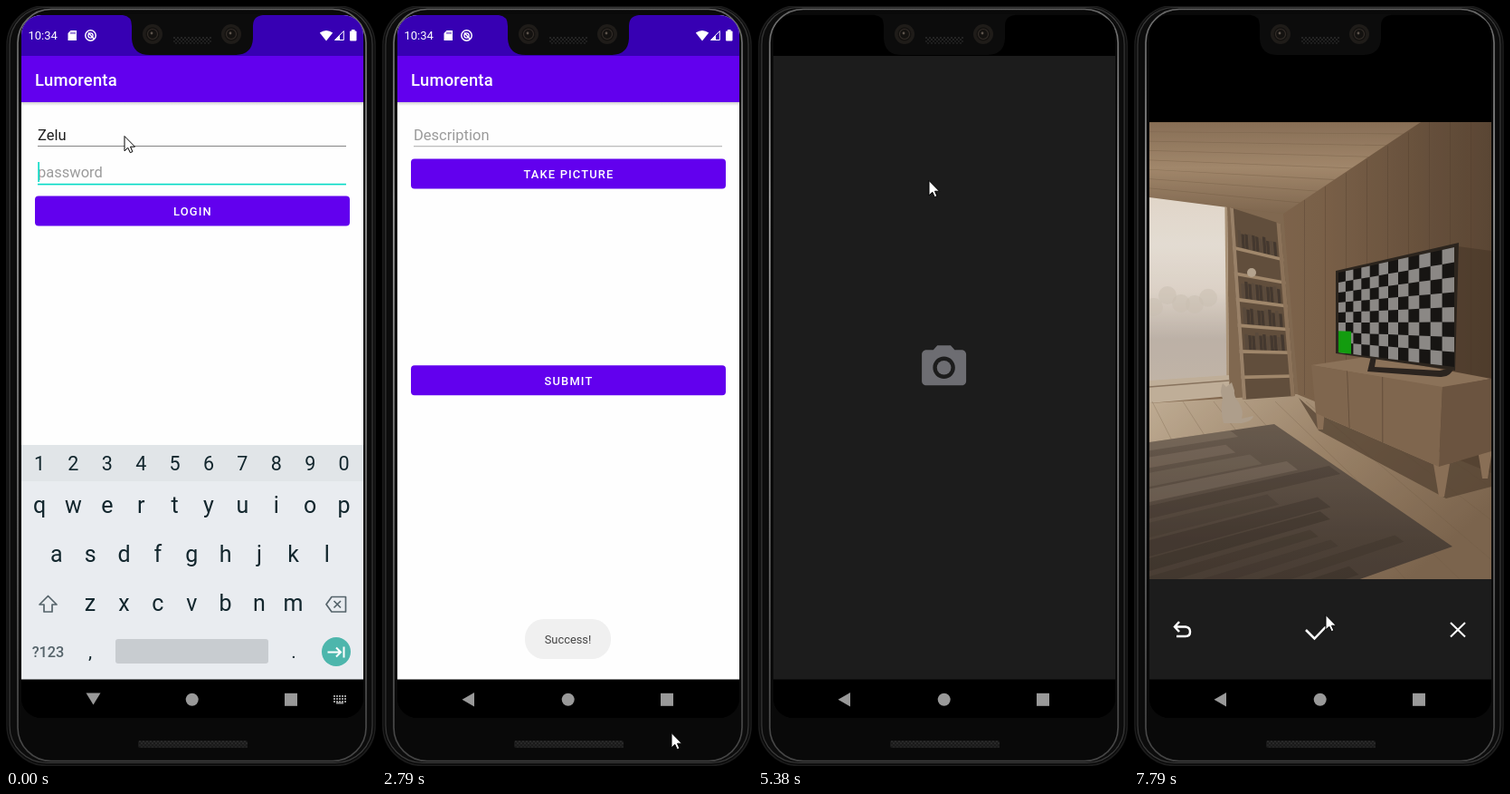
An HTML page that plays this animation: 409x838 px, repeating every 8000 ms.

```html
<!DOCTYPE html>
<html lang="en">
<head>
<meta charset="utf-8">
<title>Photo app demo</title>
<style>
html, body { margin: 0; width: 100%; height: 100%; overflow: hidden; background: #000; }
svg { display: block; width: 100%; height: 100%; font-family: Roboto, sans-serif; }
.mid { text-anchor: middle; }
.btn { font-size: 12.9px; font-weight: 500; letter-spacing: 1.15px; fill: #fff; text-anchor: middle; }
.field { font-size: 16.5px; fill: #1f1f1f; }
.hint { fill: #9b9b9b; }
</style>
</head>
<body>
<svg id="stage" viewBox="0 0 409 838"></svg>
<script>
const LOOP = 8000;
const TICK = 130;
const USER = 'Zelu';
const APP = 'Lumorenta';
// Pointer way points: time, x, y.
const POINTER = [[0, 131, 143], [1320, 131, 143], [1620, 227, 215], [2280, 227, 215], [2790, 320, 801],
  [3030, 192, 491], [3420, 161, 216], [4080, 198, 158], [4230, 191, 186], [5380, 189, 192],
  [5680, 192, 282], [6310, 225, 671], [6580, 212, 671], [LOOP, 212, 671]];

const rect = (x, y, w, h, fill, r = 0, more = '') =>
  `<rect x="${x}" y="${y}" width="${w}" height="${h}" rx="${r}" fill="${fill}" ${more}/>`;
const poly = (pts, fill, more = '') => `<polygon points="${pts}" fill="${fill}" ${more}/>`;
const circle = (x, y, r, fill, more = '') => `<circle cx="${x}" cy="${y}" r="${r}" fill="${fill}" ${more}/>`;
const path = (d, fill, more = '') => `<path d="${d}" fill="${fill}" ${more}/>`;
const line = (d, color, w, more = '') => path(d, 'none', `stroke="${color}" stroke-width="${w}" ${more}`);
const text = (x, y, s, more = '') => `<text x="${x}" y="${y}" ${more}>${s}</text>`;
const group = (id, body, more = '') => `<g id="${id}" ${more}>${body}</g>`;
const clip = (id, shape) => `<clipPath id="${id}">${shape}</clipPath>`;
const times = (n, f) => Array.from({ length: n }, (_, i) => f(i)).join('');
const mix = (a, b, k) => a + (b - a) * k;
const grad = (id, colors, dir = 'x2="0" y2="1"') => `<linearGradient id="${id}" ${dir}>` +
  colors.map((c, i) => `<stop offset="${i / (colors.length - 1)}" stop-color="${c}"/>`).join('') + '</linearGradient>';

let seed = 7;
const random = () => (seed = seed * 16807 % 2147483647) / 2147483647;

// A flat surface seen in perspective; patches are given in 0..1 across and down.
function plane(tl, tr, br, bl) {
  const at = (u, v) => [0, 1].map(n => mix(mix(tl[n], tr[n], u), mix(bl[n], br[n], u), v).toFixed(1)).join();
  return (fill, u0 = 0, v0 = 0, u1 = 1, v1 = 1, more = '') =>
    poly([at(u0, v0), at(u1, v0), at(u1, v1), at(u0, v1)].join(' '), fill, more);
}

const button = (y, label, wave) => rect(32, y, 348, 33, '#6200ee', 4) +
  (wave ? clip(wave + 'Clip', rect(32, y, 348, 33, '#000', 4)) +
    `<g clip-path="url(#${wave}Clip)">${circle(0, 0, 0, '#fff', `id="${wave}" fill-opacity=".25"`)}</g>` : '') +
  text(206.5, y + 21.5, label, 'class="btn"');

function appChrome() {
  return rect(17, 10, 378, 733, '#fefefe') + rect(17, 106, 378, 4, 'url(#shade)') +
    rect(17, 10, 378, 45, '#3700b3') + rect(17, 55, 378, 51, '#6200ee') +
    text(32, 88, APP, 'fill="#fff" font-size="18.4" font-weight="500" letter-spacing=".2"') +
    text(24.5, 37, '10:34', 'fill="#fff" font-size="13"') +
    path('M71.5 27H78V38H68.5V30Z', '#fff') + line('M72 28.5v2.5M74 28.5v2.5M76 28.5v2.5', '#3700b3', .9) +
    circle(93.5, 32.5, 5.7, 'none', 'stroke="#fff" stroke-width="1.5"') +
    circle(93.5, 32.5, 2.6, 'none', 'stroke="#fff" stroke-width="1.3"') + line('M91 29.5l6.5 7', '#fff', 1.5) +
    path('M346.8 29.5Q354 24.5 361.2 29.5L354 38.5Z', '#fff') +
    line('M363.5 37.5H373.3V27.6Z', '#fff', 1) + path('M363.5 38L369 32.5V38Z', '#fff') +
    rect(380, 27.5, 7.5, 11, '#fff', 1) + rect(382, 26, 3.5, 2, '#fff');
}

function keyboard() {
  const row = (chars, x, y, size) => [...chars].map((c, i) =>
    text(x + 37.4 * i, y, c, `class="mid" fill="#12262d" font-size="${size}"`)).join('');
  const icon = d => line(d, '#56646b', 1.7, 'stroke-linejoin="round"');
  return rect(17, 484, 378, 259, '#e9ecf0') + rect(17, 484, 378, 40, '#e1e5e8') +
    row('1234567890', 37, 512, 21.5) + row('qwertyuiop', 37, 559, 25) +
    row('asdfghjkl', 55.7, 613, 25) + row('zxcvbnm', 93, 667, 25) +
    icon('M46.5 650.5L37 660H42V668H51V660H56Z') +
    icon('M360 651.5H375.5V668H360L354 659.8ZM362.5 656l7.5 7.5M370 656l-7.5 7.5') +
    text(46.5, 718, '?123', 'class="mid" fill="#56646b" font-size="16.3" font-weight="500"') +
    row(',', 93, 719, 21) + row('.', 318, 719, 21) +
    rect(121, 698, 169, 27, '#c8ccd0', 3) + circle(365, 712, 16, '#4db6ac') +
    line('M355.5 712.5H370M365 707.5l5 5l-5 5M373.5 706.5v12', '#fff', 2);
}

function login() {
  return appChrome() +
    text(35, 148, USER, 'class="field"') + rect(35, 154, 341, 1, '#858585') +
    text(35, 189, 'password', 'class="field hint" id="hint"') +
    text(35.5, 189, '', 'class="field" id="secret"') +
    rect(35, 195.8, 341, 1.6, '#03dac5') + rect(0, 172, 1.6, 22, '#03dac5', 0, 'id="caret"') +
    button(209.5, 'LOGIN', 'loginWave') + group('keys', keyboard());
}

function post() {
  return appChrome() + text(35, 148, 'Description', 'class="field hint"') +
    rect(35, 154, 341, 1.3, '#909090', 0, 'id="rule"') +
    button(168.5, 'TAKE PICTURE', 'shotWave') + button(396.3, 'SUBMIT') +
    group('toast', rect(158, 676, 95, 44, '#f0f0f0', 21) +
      text(205.5, 703, 'Success!', 'class="mid" font-size="12.9" fill="#444"'));
}

function television() {
  const cols = 12, rows = 8;
  const glass = plane([226, 294], [354, 266], [354, 398], [226, 382]);
  const col = i => (i / cols) * mix(.72, 1, i / cols);
  const cells = times(cols * rows, n => {
    const i = n % cols, j = Math.floor(n / cols);
    return (i + j) % 2 ? glass('#8f8e8d', col(i), j / rows, col(i + 1), (j + 1) / rows) : '';
  });
  return path('M262 386H268L266 398L338 402L354 398Q350 410 338 409L258 403Z', '#1d1713') +
    plane([223, 292], [359, 261], [355, 402], [223, 383])('#1e1812') +
    glass('#050505') + cells + glass('#00a600', 0, .73, .11, 1);
}

function shelf() {
  const rack = plane([106, 222], [162, 240], [178, 430], [120, 434]);
  return rack('#5d4936') + times(6, i => {
    const y = .2 + .135 * i;
    const books = times(11, b => rack(b % 3 ? '#3a2f26' : '#544435', .12 + .07 * b, y - .075 - .02 * random(), .18 + .07 * b, y));
    return (i === 1 || i === 5 ? '' : books) + rack('#a88d6e', 0, y, 1, y + .018);
  }) + circle(130, 294, 5, '#c0ae97') + rack('#a0856a', 0, 0, .07, 1) + rack('#8f7458', .92, 0, 1, 1);
}

function cabinet() {
  const front = plane([196, 396], [341, 420], [337, 508], [201, 449]);
  const side = plane([341, 420], [395, 411], [395, 491], [337, 508]);
  const leg = (x, y, h) => poly(`${x - h / 4},${y} ${x + h / 4},${y} ${x + 3},${y + h} ${x - 3},${y + h}`, '#8d7055');
  return poly('182,432 201,449 337,508 395,490 395,530 345,543 260,498 204,468', '#4c3a29', 'opacity=".75"') +
    leg(206, 448, 19) + leg(340, 505, 36) + leg(388, 488, 33) +
    poly('196,396 262,386 395,411 341,421', '#8f7358') + front('#80654b') + side('#69503a') +
    front('#5c4632', .27, 0, .276, 1) + front('#5c4632', .54, 0, .546, 1);
}

function room() {
  const wall = plane([165, 229], [395, 80], [395, 420], [165, 430]);
  const ceiling = plane([17, 128], [317, 128], [165, 229], [17, 211]);
  const pane = plane([17, 211], [103, 222], [105, 412], [17, 420]);
  const rug = plane([-150, 505], [155, 461], [352, 596], [0, 720]);
  const trees = times(5, i => circle(22 + 15 * i, 332 - 14 * random(), 10, '#d8cdbf', 'opacity=".5"'));
  const seams = times(9, i => line(`M${20 + 34 * i} 436L${120 + 60 * i} 632`, '#6c543d', .8, 'opacity=".35"'));
  const streaks = times(12, i => {
    const v = i / 12;
    return rug(i < 4 ? '#9c8a78' : '#1f1812', 0, v, 1 - .3 * random(), v + .03 + .05 * random(), `opacity="${.15 + .2 * random()}"`);
  });
  return '<g clip-path="url(#photo)">' + rect(17, 128, 378, 504, 'url(#wall)') +
    times(9, i => wall('#4b3725', .1 * i + .1, 0, .1 * i + .103, 1, 'opacity=".5"')) +
    ceiling('url(#ceil)') + times(8, i => ceiling('#664d36', 0, i / 8, 1, i / 8 + .008, 'opacity=".35"')) +
    plane([103, 222], [165, 229], [182, 432], [105, 436])('#82684d') +
    plane([358, 265], [395, 270], [395, 416], [352, 404])('#3c2b1d', 0, 0, 1, 1, 'opacity=".55"') +
    pane('url(#glass)') + trees + pane('#b39a7c', .97, 0, 1, 1) +
    plane([17, 413], [105, 407], [106, 430], [17, 438])('#cdbba3') + line('M17 420L105 413', '#8b755e', 1.5) +
    poly('17,438 180,428 395,515 395,632 17,632', 'url(#floor)') + seams +
    rug('url(#carpet)') + streaks + shelf() +
    path('M98 416L102 420L108 415L111 424Q110 430 115 436Q122 446 119 455L132 452Q132 457 119 460H99Q95 445 98 433Q94 425 98 416Z', '#b9a894') +
    cabinet() + television() + '</g>';
}

const CAMERA = 'M9 2L7.17 4H4c-1.1 0-2 .9-2 2v12c0 1.1.9 2 2 2h16c1.1 0 2-.9 2-2V6c0-1.1-.9-2-2-2h-3.17L15 2H9z' +
  'm3 15c-2.76 0-5-2.24-5-5s2.24-5 5-5 5 2.24 5 5-2.24 5-5 5z';
const cameraIcon = (id, y, scale, color) => group(id, path(CAMERA, color) + circle(12, 12, 3.2, color),
  `transform="translate(205.6 ${y}) scale(${scale}) translate(-12 -11)"`);

function camera() {
  return rect(17, 10, 378, 733, '#000') + rect(17, 55, 378, 688, '#1c1c1c') +
    cameraIcon('cover', 396.3, 2.45, '#6d6d72') +
    group('preview', rect(17, 55, 378, 73, '#000') + room() +
      rect(17, 128, 378, 504, '#776b5e', 0, 'id="haze"') + rect(17, 632, 378, 111, '#1c1c1c') +
      group('more', circle(361.5, 599, 21.5, '#4b4037', 'opacity=".75"') +
        times(3, i => circle(356 + 5.5 * i, 599, 1.9, '#fff'))) +
      cameraIcon('shutter', 685.8, 1.85, '#fff') +
      group('review', line('M50 679L45 684.5L50 690M45 684.5H57Q62 685 62 690T57 695H47' +
        'M190 688L199.5 697.5L212 684.5', '#fff', 2.5) + line('M350 680L366 695.5M366 680L350 695.5', '#fff', 2)));
}

function nav() {
  return rect(17, 742.5, 378, 43, '#000') + path('M88.5 757.5H104.5L96.5 770.5Z', '#999', 'id="navDown"') +
    path('M102 757V772.5L88.5 764.8Z', '#999', 'id="navBack"') + circle(205.7, 764.8, 7, '#999') +
    rect(308, 757.8, 14, 14, '#999') +
    group('navKeys', times(15, i => rect(362 + 3 * (i % 5), 760 + 3 * Math.floor(i / 5), 2, 2, '#999')) + rect(365, 767.5, 8, 2, '#999'));
}

const grille = (x, y, n) => times(n, i => circle(x + 2 * i, y + (i % 2) * 2, .9, '#303030') +
  circle(x + 2 * i, y + 4 + (i % 2) * 2, .9, '#282828'));

const shell = () => rect(1, -.5, 407, 838, '#0c0c0c', 44, 'stroke="#1c1c1c" stroke-width="1.5"') +
  rect(4, 1.5, 401, 833, 'none', 41, 'stroke="#3a3a3a" stroke-width="1.2"') +
  rect(13, 3.5, 385, 829, '#090909', 37, 'stroke="url(#rim)" stroke-width="1.6"');

function notch() {
  const lens = x => circle(x, 31, 11, '#1f1c19') + circle(x, 31, 7.5, '#141210') +
    circle(x, 31, 5.5, 'none', 'stroke="#332d28" stroke-width="1.2"') + circle(x - 1, 30, 1.4, '#5d544c');
  return path('M129 10Q139 11 139 22V36Q140 54 159 54H253Q272 54 273 36V22Q273 11 284 10V9H129Z', '#0c0c0c') +
    lens(162) + lens(249) + grille(186, 35, 21);
}

document.getElementById('stage').innerHTML = '<defs>' +
  grad('shade', ['#cfcfcf', '#fefefe']) + grad('rim', ['#666', '#aaa', '#888', '#666', '#444']) +
  grad('wall', ['#8b6e51', '#7a5e44', '#553f2c'], '') +
  grad('ceil', ['#8a6f54', '#a98c6d', '#80664c']) +
  grad('glass', ['#f4eadd', '#f8f1e8', '#eee4d9', '#c9beb4', '#cfc2b4']) +
  grad('floor', ['#cdb99e', '#a1876a', '#7c634a'], 'x2="1" y2=".6"') +
  grad('carpet', ['#65574a', '#453930', '#352b23']) +
  clip('screen', rect(17, 10, 378, 775, '#000', 22)) + clip('photo', rect(17, 128, 378, 504, '#000')) + '</defs>' +
  shell() + '<g clip-path="url(#screen)">' + rect(17, 10, 378, 775, '#000') +
  group('login', login()) + group('post', post()) + group('camera', camera()) + nav() + '</g>' +
  rect(146, 810, 121, 8, '#1a1a1a', 2) + grille(148, 811, 60) + notch() +
  group('pointer', path('M0 .5V16.8L3.8 13.3L6.3 18.7L8.9 17.6L6.5 12.2H11.5Z', '#fff', 'stroke="#000"'));

const ui = {};
document.querySelectorAll('#stage [id]').forEach(el => ui[el.id] = el);
const set = (id, attrs) => { for (const k in attrs) ui[id].setAttribute(k, attrs[k]); };
const show = (id, on) => set(id, { opacity: +on, visibility: on > 0 ? 'inherit' : 'hidden' });
const ease = k => 1 - (1 - k) ** 2;

// Progress from a to b, in whole refreshes.
function ramp(t, a, b) {
  const steps = Math.max(1, Math.round((b - a) / TICK));
  const k = Math.min(1, Math.max(0, (t - a) / (b - a)));
  return Math.floor(k * steps + 1e-6) / steps;
}

function pointerAt(t) {
  const i = POINTER.findIndex(p => p[0] > t);
  const [a, b] = [POINTER[i - 1], POINTER[i]];
  const k = ramp(t, a[0], b[0]);
  return [1, 2].map(n => Math.round(mix(a[n], b[n], k)));
}

function draw(t) {
  set('pointer', { transform: `translate(${pointerAt(t)})` });

  const typed = t < 370 ? 0 : 1 + Math.round(3 * ramp(t, 370, 760));
  ui.secret.textContent = typed ? '•'.repeat(typed - 1) + USER[typed - 1].toLowerCase() : '';
  show('hint', !typed);
  set('caret', { x: 35.3 + (typed ? ui.secret.getComputedTextLength() : 0) });
  show('caret', t < 1320 || t >= 1770);
  set('loginWave', { cx: 212, cy: 226, r: 230 * ramp(t, 1620, 2010) });
  set('keys', { transform: `translate(0 ${262 * ease(ramp(t, 2040, 2400))})` });

  const opened = ease(ramp(t, 2160, 2520));
  const covered = ease(ramp(t, 4470, 4890));
  show('login', opened < 1);
  show('post', covered < 1 ? opened : 0);
  set('post', { transform: `translate(0 ${30 * (1 - opened)})` });
  set('rule', { fill: t < 2910 ? '#bcbcbc' : '#909090' });
  show('toast', ramp(t, 2400, 2760) * (1 - .35 * ramp(t, 4110, 4470)));
  set('shotWave', { cx: 203.5, cy: 185, r: 166 * ramp(t, 4110, 4470) });

  show('camera', covered);
  show('cover', t >= 5380);
  show('preview', ramp(t, 5380, 5680));
  show('shutter', 1 - ramp(t, 7130, 7550));
  show('more', t < 7550);
  show('review', ramp(t, 7400, 7670));
  show('haze', .16 * ramp(t, 7400, 7790));

  show('navDown', t < 2280);
  show('navKeys', t < 2280);
  show('navBack', t >= 2280);
}

function tick() {
  draw(performance.now() % LOOP);
  requestAnimationFrame(tick);
}
tick();
</script>
</body>
</html>
```
